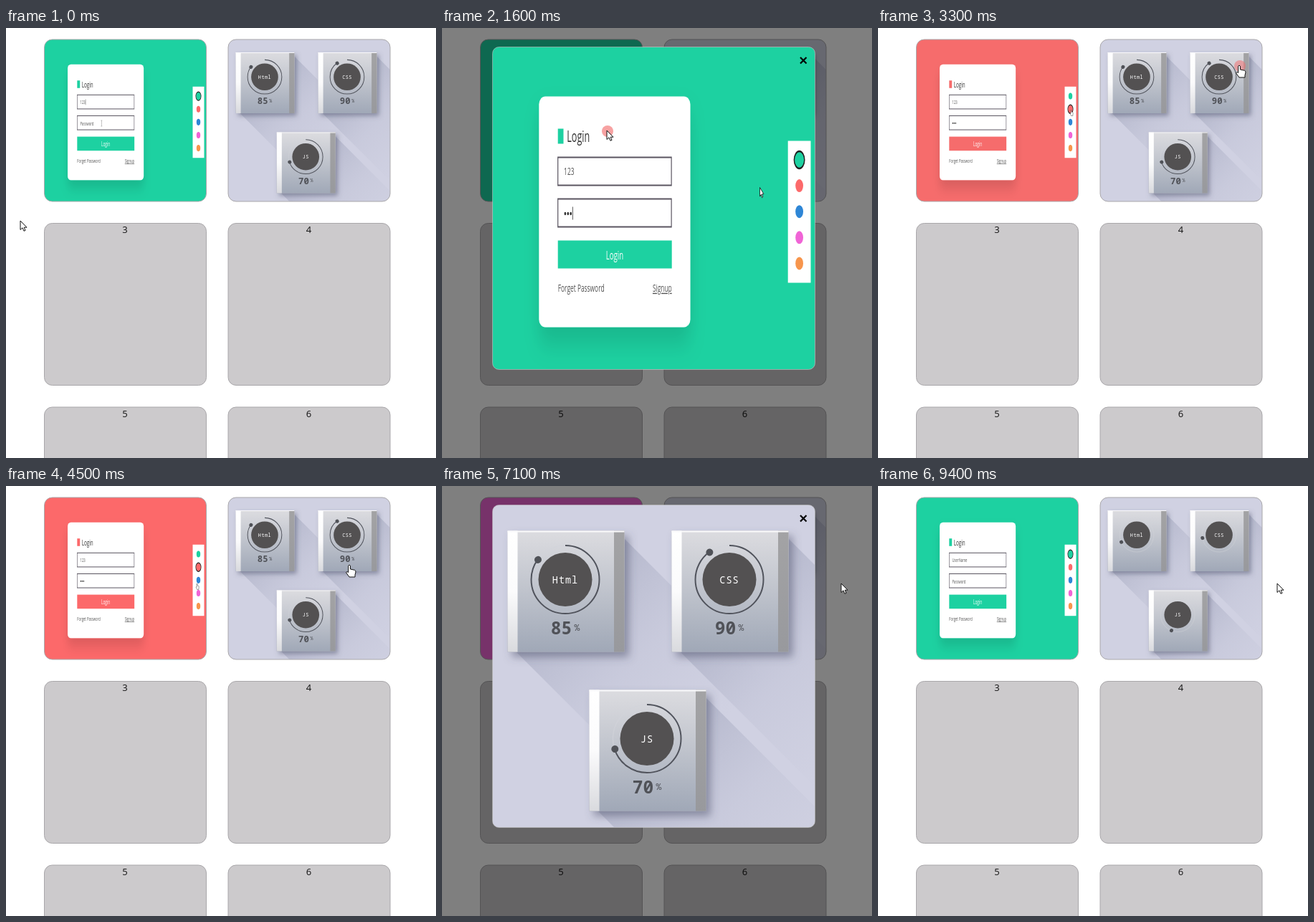
These frames come from a looping animation (600x600 px, 9.5 s). An HTML page:

```html
<!DOCTYPE html>
<html lang="en">
<head>
<meta charset="utf-8">
<title>Card gallery</title>
<style>
  html, body { margin: 0; width: 100%; height: 100%; overflow: hidden; background: #fff; }
  svg { display: block; width: 100%; height: 100%; }
  text { font-family: "Open Sans", "Noto Sans", sans-serif; }
  .mono { font-family: "Noto Sans Mono", "DejaVu Sans Mono", monospace; text-anchor: middle; }
  .mid { text-anchor: middle; }
  .field { fill: #fff; stroke: #5a5560; stroke-width: 2; }
  .small { font-size: 14px; fill: #555; }
</style>
</head>
<body>
<svg id="stage" viewBox="0 0 600 600"></svg>
<script>
const LOOP = 9500;
const PALETTE = [[29, 209, 161], [252, 105, 106], [46, 134, 214], [240, 100, 214], [247, 149, 76]];
const PICKS = [2884, 5050, 6080, 7280];   // clicks on the colour dots
const FORM_RESTART = 8900, DIAL_RESTART = 7800;
const CLICKS = [1500, 3150, 4700, 8600];  // clicks that open or close the modal
const DIALS = [
  { name: "Html", value: 85, x: 21, y: 36 },
  { name: "CSS", value: 90, x: 250, y: 36 },
  { name: "JS", value: 70, x: 135, y: 258 },
];
// time, x, y
const POINTER = [[0, 20, 269], [150, 20, 269], [1200, 230, 143], [2100, 230, 143], [2900, 504, 52],
  [3300, 504, 52], [4100, 479, 110], [5750, 479, 110], [6600, 557, 136], [LOOP, 557, 136]];
const FORM_POINTER = [[0, 159, 233], [900, 159, 233], [1600, 373, 196], [2000, 373, 196], [2750, 430, 195],
  [3800, 430, 195], [4400, 424, 239], [5200, 428, 232], [5900, 429, 267], [6500, 429, 267],
  [7100, 429, 303], [LOOP, 429, 303]];

const $ = id => document.getElementById(id);
const rgb = c => `rgb(${c.map(Math.round)})`;
const clamp = v => Math.max(0, Math.min(1, v));
const set = (id, attrs) => { for (const k in attrs) $(id).setAttribute(k, attrs[k]); };
const show = (id, on) => set(id, { opacity: +on });

const dotY = i => 157.5 + 36.1 * i;
const cardX = col => 53.5 + 256.5 * col;
const cardY = row => 16 + 256.5 * row;

const cursors = `
  <path id="arrow" d="M0 0V12.5L3 9.8 5 14.3 7 13.4 5.2 9.2H9Z" fill="#fff" stroke="#111" stroke-linejoin="round"/>
  <path id="hand" d="M-1.3 1.2Q0 -.8 1.5 1.2V6L7.5 7.3Q9 7.8 9 10L8 14V17H0L-4.3 11Q-4.2 8.6-1.3 10.5Z"
    fill="#fff" stroke="#111" stroke-linejoin="round"/>
  <path id="beam" d="M-3 -8H3M0 -8V8M-3 8H3" stroke="#666" fill="none"/>`;

// Recorded wide and shown in a square, so the whole form is squeezed sideways.
const form = `<g id="form">
  <rect class="accent" width="450" height="450"/>
  <g transform="scale(.6 1)">
    <rect x="108" y="69" width="352" height="322" rx="15" ry="11" fill="#fff" filter="url(#soft)"/>
    <rect class="accent" x="152" y="114" width="13" height="21"/>
    <text x="173" y="133" font-size="21" fill="#333">Login</text>
    <rect class="field" x="152" y="154" width="264" height="39"/>
    <rect class="field" x="152" y="212" width="264" height="39"/>
    <text id="user" class="small" x="166" y="179"></text>
    <text id="pass" class="small" x="166" y="238"></text>
    <path id="bullets" stroke="#333" stroke-width="4.5" stroke-linecap="round" stroke-dasharray="0 6.5" fill="none"/>
    <path id="caret" stroke="#333" fill="none"/>
    <rect class="accent" x="152" y="270" width="265" height="39"/>
    <text class="mid" x="284" y="297" font-size="16" fill="#fff">Login</text>
    <text class="small" x="152" y="342">Forget Password</text>
    <text class="small" x="417" y="342" text-anchor="end" text-decoration="underline">Signup</text>
    <rect x="687" y="131" width="53" height="198" fill="#fff"/>
    ${PALETTE.map((c, i) => `<circle id="dot${i}" cx="713.5" cy="${dotY(i)}" fill="${rgb(c)}" stroke="#222"/>`).join("")}
    <circle id="formRipple" r="10" fill="#ff6b8a"/>
    <g id="formPointer"><use id="formShape"/></g>
  </g></g>`;

const dialShadow = d => `<path transform="translate(${d.x} ${d.y})" d="M8 165 160 8 360 208 208 365Z" fill="url(#cast)"/>`;
const dialCard = (d, i) => `<g transform="translate(${d.x} ${d.y})">
  <rect width="163" height="169" fill="#aab" filter="url(#drop)"/>
  <rect width="163" height="169" fill="url(#face)"/>
  <rect width="14" height="169" fill="url(#lit)"/>
  <rect x="148.500" width="14.500" height="169" fill="url(#shade)"/>
  <path d="M0 1H163" stroke="#fafafc" stroke-width="2"/>
  <g transform="translate(80.500 68)">
    <circle r="47.500" fill="none" stroke="#d3d4da" stroke-width="1.500" opacity=".6"/>
    <circle class="done" r="47.500" fill="none" stroke="#50535c" stroke-width="2" pathLength="100"
      stroke-dasharray="${d.value} 100" transform="rotate(-90)"/>
    <circle r="37.500" fill="#535152"/>
    <circle id="knob${i}" cy="-47" r="5" fill="#505258"/>
    <text class="mono" y="5" font-size="13.500" letter-spacing="1" fill="#fff">${d.name}</text>
    <g class="done" fill="#505258">
      <text class="mono" x="-5.500" y="76" font-size="24.500" font-weight="700">${d.value}</text>
      <text class="mono" x="16.500" y="71" font-size="13">%</text>
    </g>
  </g></g>`;
const dials = `<g id="dials"><rect width="450" height="450" fill="#d0d1e2"/>
  ${DIALS.map(dialShadow).join("")}${DIALS.map(dialCard).join("")}</g>`;

const gradient = (id, stops, extra = 'x2="0" y2="1"') => `<linearGradient id="${id}" ${extra}>${stops.map(
  ([color, alpha = 1], i) => `<stop offset="${i / (stops.length - 1)}" stop-color="${color}" stop-opacity="${alpha}"/>`).join("")}</linearGradient>`;

const card = (col, row) => {
  const n = row * 2 + col + 1, x = cardX(col), y = cardY(row);
  const frame = fill => `<rect x="${x}" y="${y}" width="226" height="226" rx="11" fill="${fill}" stroke="#a9a7aa"/>`;
  if (row) return frame("#cccacc") + `<text class="mid" x="${x + 112.5}" y="${y + 13.5}" font-size="13" fill="#111">${n}</text>`;
  return `<g transform="translate(${x} ${y}) scale(${226 / 450})" clip-path="url(#cardClip)">
    <use href="#${col ? "dials" : "form"}"/></g>${frame("none")}`;
};

$("stage").innerHTML = `<defs>
  ${cursors}
  ${gradient("face", [["#dcdce0"], ["#bfc3cc"], ["#a0a8b7"]])}
  ${gradient("lit", [["#fff"], ["#fbfbfc"], ["#d9dade"]])}
  ${gradient("shade", [["#a3a3a5"], ["#98999d"]])}
  ${gradient("cast", [["#8b90aa", .42], ["#a5a9c0", .17], ["#b0b4c8", 0]],
    'gradientUnits="userSpaceOnUse" x1="80" y1="80" x2="284" y2="284"')}
  <filter id="drop" x="-30%" y="-30%" width="170%" height="170%">
    <feDropShadow dx="6" dy="7" stdDeviation="6" flood-color="#4b5068" flood-opacity=".5"/></filter>
  <filter id="soft" x="-30%" y="-30%" width="160%" height="170%">
    <feDropShadow dx="0" dy="22" stdDeviation="18" flood-opacity=".13"/></filter>
  <clipPath id="cardClip"><rect width="450" height="450" rx="22"/></clipPath>
  <clipPath id="modalClip"><rect width="450" height="450" rx="9"/></clipPath>
  ${form}${dials}
  </defs>
  <rect width="600" height="600" fill="#fff"/>
  ${[0, 1, 2].map(row => card(0, row) + card(1, row)).join("")}
  <g id="modal">
    <rect width="600" height="600" opacity=".5"/>
    <g transform="translate(70.500 26.500)">
      <g clip-path="url(#modalClip)"><use id="modalScene"/></g>
      <rect width="450" height="450" rx="9" fill="none" stroke="#ccc" stroke-opacity=".6"/>
      <path d="M429.500 14.500l8.500 8.500m0-8.500l-8.500 8.500" stroke="#000" stroke-width="2.200"/>
    </g>
  </g>
  <circle id="ripple" r="8" fill="#f26d6d"/>
  <g id="pointer"><use id="pointerShape"/></g>`;

function along(keys, t) {
  const i = Math.max(1, keys.findIndex(k => k[0] >= t));
  const [t0, x0, y0] = keys[i - 1], [t1, x1, y1] = keys[i];
  const p = clamp((t - t0) / (t1 - t0)), e = p * p * (3 - 2 * p);
  return [x0 + (x1 - x0) * e, y0 + (y1 - y0) * e];
}

function ripple(id, starts, t, life, x, y) {
  const start = starts.find(s => t >= s && t < s + life);
  set(id, { cx: x, cy: y, opacity: start === undefined ? 0 : .85 * (1 - (t - start) / life) });
}

function drawForm(t) {
  const fresh = t >= FORM_RESTART;
  const picked = fresh ? 0 : PICKS.filter(p => t >= p).length;
  let color = PALETTE[picked];
  if (picked) {
    const p = clamp((t - PICKS[picked - 1]) / 500), e = 1 - (1 - p) ** 2;
    color = color.map((v, i) => PALETTE[picked - 1][i] + (v - PALETTE[picked - 1][i]) * e);
  }
  document.querySelectorAll(".accent").forEach(el => el.setAttribute("fill", rgb(color)));
  PALETTE.forEach((_, i) => set("dot" + i, { r: i === picked ? 12 : 9, "stroke-width": i === picked ? 2.5 : 0 }));

  const typed = fresh ? 0 : [700, 900, 1100].filter(s => t >= s).length;
  $("user").textContent = fresh ? "UserName" : "123";
  $("pass").textContent = typed ? "" : "Password";
  set("bullets", { d: typed ? `M169 232.500h${(typed - 1) * 6.5 + .1}` : "" });
  const caret = t < 500 ? "M191 166v16" : t < 2300 ? `M${167 + typed * 6.5} 223v18` : "";
  set("caret", { d: fresh ? "" : caret });

  const [x, y] = along(FORM_POINTER, t);
  show("formPointer", !fresh);
  set("formPointer", { transform: `translate(${x / .6} ${y})` });
  set("formShape", { href: t < 1000 ? "#beam" : x > 415 ? "#hand" : "#arrow" });
  ripple("formRipple", PICKS, t, 300, x / .6 + 7, y - 2);
}

function drawDials(t) {
  const running = t >= DIAL_RESTART;
  const progress = running ? clamp((t - DIAL_RESTART) / 2000) : 1;
  DIALS.forEach((d, i) => set("knob" + i, { transform: `rotate(${3.6 * d.value * progress})` }));
  document.querySelectorAll(".done").forEach(el => el.setAttribute("opacity", running ? 0 : 1));
}

function drawPointer(t, open) {
  const [x, y] = along(POINTER, t);
  const inside = (v, start) => v > start && v < start + 226;
  const overCard = [0, 1].some(c => inside(x, cardX(c))) && [0, 1, 2].some(r => inside(y, cardY(r)));
  const overClose = x > 494 && x < 515 && y > 34 && y < 60;
  set("pointer", { transform: `translate(${x} ${y})` });
  set("pointerShape", { href: (open ? overClose : overCard) ? "#hand" : "#arrow" });
  ripple("ripple", CLICKS, t, 400, x + 1, y + 1);
}

function frame() {
  const t = performance.now() % LOOP;
  const clicks = CLICKS.filter(c => t >= c).length, open = clicks % 2 === 1;
  drawForm(t);
  drawDials(t);
  show("modal", open);
  set("modalScene", { href: clicks > 2 ? "#dials" : "#form" });
  drawPointer(t, open);
  requestAnimationFrame(frame);
}
frame();
</script>
</body>
</html>
```
